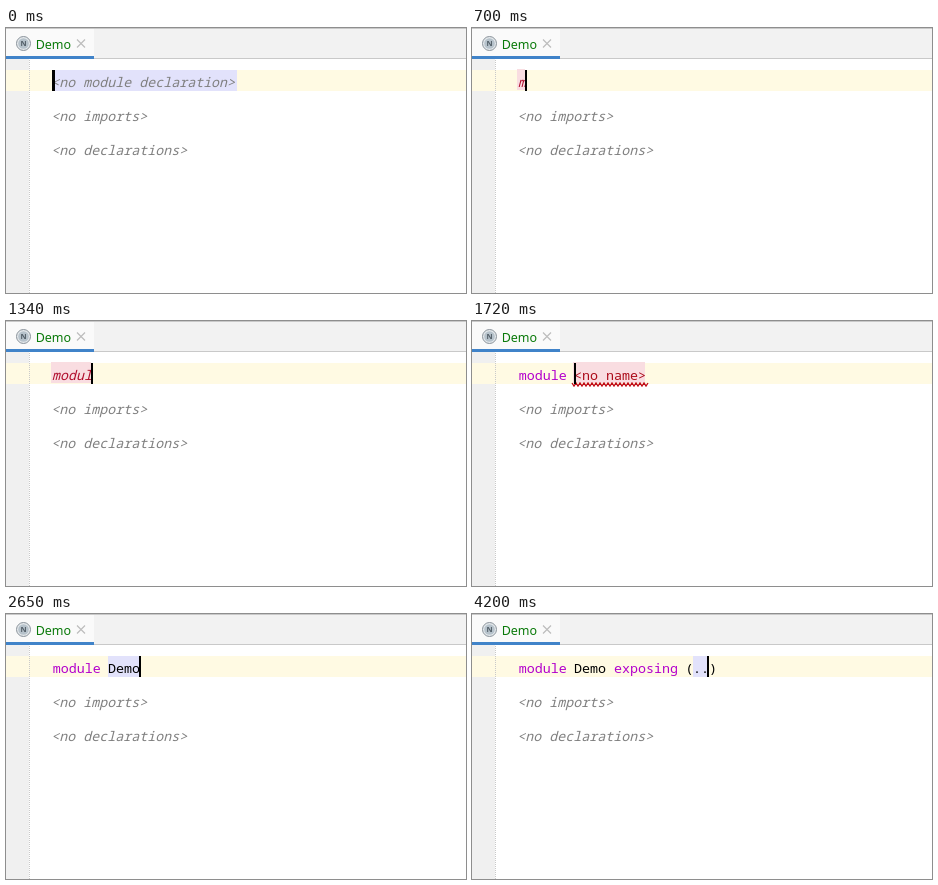
These frames come from a looping animation (460x265 px, 4270 ms). An HTML page:

```html
<!DOCTYPE html>
<html lang="en">
<head>
<meta charset="utf-8">
<title>Module editor</title>
<style>
  html, body { margin: 0; width: 460px; height: 265px; overflow: hidden; background: #fff; }
  svg { display: block; }
  .code { font: 13.33px "Noto Sans Mono", "DejaVu Sans Mono", monospace; white-space: pre; }
  .hint { fill: #808080; font-style: italic; }
  .typed { fill: #b00d2c; font-style: italic; }
  .error { fill: #ac0c1a; }
  .keyword { fill: #b300cc; }
  .plain { fill: #000; }
  .tab { font: 12.5px "Noto Sans", "Open Sans", sans-serif; fill: #0a7a0a; }
  .icon { font: bold 7.5px "Noto Sans", "Open Sans", sans-serif; fill: #505c66; text-anchor: middle; }
</style>
</head>
<body>
<svg width="460" height="265" viewBox="0 0 460 265">
  <rect width="460" height="265" fill="#fff"/>
  <rect y="31" width="23" height="234" fill="#f0f0f0"/>
  <rect y="42" width="460" height="21" fill="#fffae3"/>
  <path d="M23.5 32V265" stroke="#c9c9c9" stroke-dasharray="1 1"/>

  <rect width="460" height="30" fill="#f2f2f2"/>
  <rect y="30" width="460" height="1" fill="#c9c9c9"/>
  <rect width="88" height="28" fill="#fafafa"/>
  <rect width="460" height="1" fill="#c9c9c9"/>
  <rect y="28" width="88" height="3" fill="#4083c9"/>
  <circle cx="17.5" cy="15.5" r="7" fill="#e4e8eb" stroke="#8b949c"/>
  <circle cx="17.5" cy="15.5" r="5.3" fill="#b6c2cb"/>
  <text class="icon" x="17.5" y="18.2">N</text>
  <text class="tab" x="29.7" y="20.5">Demo</text>
  <path d="M71 11.5l8 8m0-8l-8 8" stroke="#bcbcbc" stroke-width="1.1"/>

  <rect id="cell" height="21"/>
  <g id="line" class="code"></g>
  <path id="wave" fill="none" stroke="#c00a14" stroke-width="1.3"/>
  <rect id="caret" y="42" height="21" fill="#000"/>
  <text class="code hint" x="45.2" y="93">&lt;no imports&gt;</text>
  <text class="code hint" x="45.2" y="127">&lt;no declarations&gt;</text>
</svg>
<script>
const LOOP = 4270, LEFT = 46, STEP = 8, NAME = LEFT + 7 * STEP;
const BLUE = "#e2e2fb", PINK = "#f9dde1";
const $ = id => document.getElementById(id);

// A step: start time, texts [class, x, string], cell [x, right, colour], caret x, wave end
const steps = [];
const add = (at, texts, cell, caret, wave) => steps.push({ at, texts, cell, caret, wave });
const keyword = ["keyword", LEFT + 0.8, "module"];

const empty = [["hint", LEFT - 0.8, "<no module declaration>"]];
add(0, empty, [LEFT, 231, BLUE], LEFT);
add(230, empty, [LEFT, 231, BLUE]);

[700, 850, 1020, 1170, 1340].forEach((at, i) => {
  const end = LEFT + (i + 1) * STEP;
  add(at, [["typed", LEFT, "module".slice(0, i + 1)]], [LEFT - 1, end - 1, PINK], end - 1);
});

const unnamed = [keyword, ["error", NAME, "<no name>"]];
add(1490, unnamed, [NAME - 1, 173, PINK], NAME);
add(1720, unnamed, [NAME - 1, 173, PINK], NAME, 176);

[2100, 2330, 2500, 2650].forEach((at, i) => {
  const end = NAME + (i + 1) * STEP;
  add(at, [keyword, ["plain", NAME, "Demo".slice(0, i + 1)]],
    [NAME, end, BLUE], end - 1, i < 2 ? end + 2 : 0);
});

const named = [keyword, ["plain", NAME, "Demo"]];
add(2730, named, [134, 141, BLUE], 139);

const full = [...named, ["keyword", 142, "exposing"],
  ["plain", 213.5, "("], ["plain", 221, ".."], ["plain", 237, ")"]];
add(3030, full, [221, 236, BLUE], 235);
add(3740, full, [221, 236, BLUE]);
add(4200, full, [221, 236, BLUE], 235);

function zigzag(end) {
  let d = "M100 62";
  for (let x = 102, low = true; x <= end; x += 2, low = !low) d += `L${x} ${low ? 65 : 62}`;
  return d;
}

function makeText([kind, x, string]) {
  const node = document.createElementNS("http://www.w3.org/2000/svg", "text");
  node.setAttribute("class", kind);
  node.setAttribute("x", x);
  node.setAttribute("y", 59);
  node.textContent = string;
  return node;
}

function show({ texts, cell: [x, right, colour], caret, wave }) {
  $("line").replaceChildren(...texts.map(makeText));
  $("cell").setAttribute("x", x);
  $("cell").setAttribute("y", colour === PINK ? 41 : 42);
  $("cell").setAttribute("width", right - x);
  $("cell").setAttribute("fill", colour);
  $("caret").setAttribute("x", caret || 0);
  $("caret").setAttribute("width", caret === LEFT ? 3 : 2); // wider at the line start
  $("caret").style.display = caret ? "" : "none";
  $("wave").setAttribute("d", wave ? zigzag(wave) : "");
}

const start = performance.now();
let current;
function tick() {
  const t = (performance.now() - start) % LOOP;
  const step = steps.findLast(s => s.at <= t);
  if (step !== current) show(current = step);
  requestAnimationFrame(tick);
}
tick();
</script>
</body>
</html>
```
